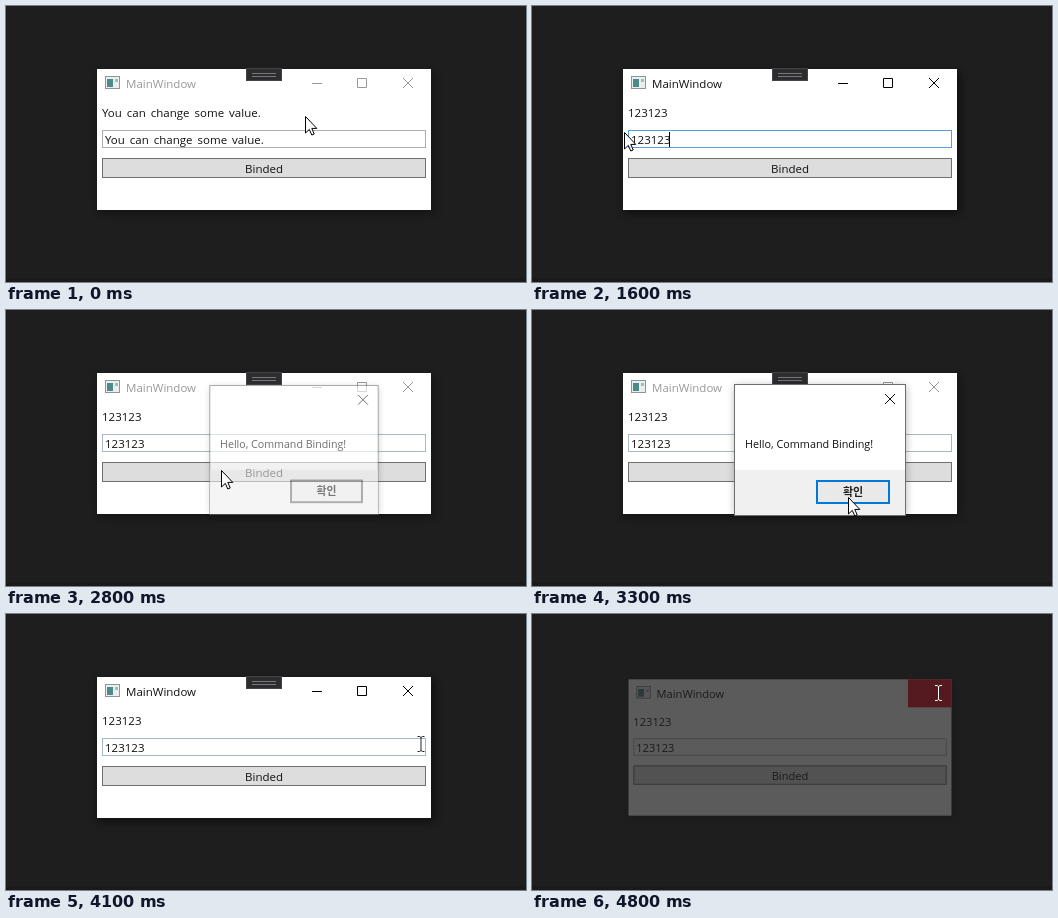
Animation of 520x276 px, one loop 4.9 s. Source, as an HTML page:

```html
<!DOCTYPE html>
<html lang="en">
<head>
<meta charset="utf-8">
<title>Binding demo</title>
<style>
  html, body { margin: 0; width: 100%; height: 100%; overflow: hidden; background: #1e1e1e; }
  svg { display: block; width: 520px; height: 276px; }
  text { font: 11.5px "Open Sans", "Noto Sans", sans-serif; word-spacing: 2px; fill: #111; white-space: pre; }
  #dialog text { font-size: 10.8px; word-spacing: 0; }
  #dialog .ok { font: 600 11px "Noto Sans CJK KR", "Noto Sans CJK", sans-serif; fill: #222; }
  .line { fill: none; stroke-width: 1; }
</style>
</head>
<body>
<svg viewBox="0 0 520 276">
  <defs>
    <filter id="soft" x="-20%" y="-20%" width="140%" height="150%"><feGaussianBlur stdDeviation="4"/></filter>
  </defs>
  <rect width="520" height="276" fill="#1e1e1e"/>
  <rect y="272" width="520" height="4" fill="#1b1a1a"/>

  <g id="window">
    <rect id="shadow" x="92" y="66" width="336" height="142" filter="url(#soft)"/>
    <rect x="91" y="63" width="334" height="141" fill="#fff"/>
    <g id="icon">
      <rect x="99.5" y="70.5" width="14" height="12" fill="#e9eeee" stroke="#8d9696"/>
      <rect x="101" y="73" width="6" height="8" fill="#4f8a8b"/>
      <rect x="109" y="73" width="3" height="3" fill="#a9b8b8"/>
    </g>
    <text id="title" x="120" y="82">MainWindow</text>
    <rect id="closeBg" x="380" y="63" width="45" height="29"/>
    <path id="sizers" class="line" d="M306 77.5h10M351.5 72.5h9v9h-9z"/>
    <path id="close" class="line" d="M397 72l10 10M407 72l-10 10"/>
    <text id="label" x="96" y="111"></text>
    <rect id="box" x="96.5" y="124.5" width="323" height="17" fill="#fff"/>
    <text id="input" x="99" y="138"></text>
    <rect id="selection" y="125" height="17" fill="#0078d7" opacity=".42"/>
    <path id="caret" class="line" stroke="#000"/>
    <rect id="button" x="96.5" y="152.5" width="323" height="19"/>
    <text x="258" y="167" text-anchor="middle">Binded</text>
  </g>

  <g id="handle">
    <rect x="240.5" y="62.5" width="35" height="12" fill="#2d2d30" stroke="#434346"/>
    <path class="line" d="M246 67.5h24M246 70.5h24" stroke="#77777a"/>
  </g>

  <g id="dialog">
    <rect x="203" y="76" width="171" height="130" filter="url(#soft)" opacity=".3"/>
    <rect x="202.5" y="74.5" width="171" height="131" fill="#fff" stroke="#6e6e6e"/>
    <rect x="203" y="160" width="170" height="45" fill="#f0f0f0"/>
    <path class="line" d="M353 84l10 10M363 84l-10 10" stroke="#111"/>
    <text x="213" y="138">Hello, Command Binding!</text>
    <rect id="okBox" x="285" y="171" width="72" height="22" stroke-width="2"/>
    <text class="ok" x="321" y="186" text-anchor="middle">확인</text>
  </g>

  <path id="arrow" d="M.5 .5V17L4.3 13.4L6.8 19L9.2 18L6.8 12.4H11.8Z" fill="#fff" stroke="#000"/>
  <path id="beam" class="line" d="M-3.5-7.5H-1.5L0-6.5L1.5-7.5H3.5M0-6.5V6.5M-3.5 7.5H-1.5L0 6.5L1.5 7.5H3.5"/>
</svg>
<script>
const LOOP = 4900, STEP = 100;
const SENTENCE = "You can change some value.", TYPED = "123123";

// time, x, y, pointer; each entry holds until the next one
const POINTER = [
  [0, 299, 110, "arrow"], [100, 288, 119, "arrow"], [200, 266, 133, "beam"], [300, 258, 134, "beam"],
  [400, 190, 134, "beam"], [500, 110, 134, "beam"], [600, 61, 135, "beam"], [700, 92, 126, "arrow"],
  [2100, 160, 136, "beam"], [2200, 221, 150, "arrow"], [2400, 215, 160, "arrow"], [2900, 230, 163, "arrow"],
  [3000, 262, 170, "arrow"], [3100, 295, 178, "arrow"], [3200, 312, 184, "arrow"], [3300, 316, 187, "arrow"],
  [3600, 335, 175, "arrow"], [3700, 352, 155, "arrow"], [3800, 362.5, 140, "beam"], [3900, 372, 153, "arrow"],
  [4000, 395, 152, "arrow"], [4100, 415, 130, "beam"], [4200, 428.5, 105, "beam"], [4300, 428.5, 80, "beam"],
  [4600, 412.5, 79, "beam"], [4700, 405.5, 80, "beam"], [4800, 406.5, 79, "beam"]
];
// time, opacity, scale
const DIALOG = [[0, 0, 1], [2700, .2, .95], [2800, .6, .985], [2900, 1, 1], [3500, .45, .97], [3600, 0, 1]];
const BORDER = [[0, "#abadb3"], [200, "#7eb4ea"], [300, "#569de5"], [2500, "#a9b9c9"], [3600, "#a0a2a6"], [4100, "#a4b8c2"]];
const BUTTON = [[0, "rest"], [2400, "hover"], [2500, "press"], [2700, "rest"], [3700, "hover"],
  [3800, "rest"], [3900, "hover"], [4100, "rest"]];
const BUTTON_LOOK = { rest: ["#ddd", "#707070"], hover: ["#bee6fd", "#3c7fb1"], press: ["#c4e5f6", "#2c628b"] };
const CLOSE = [[0, "none"], [4600, "#e81123"], [4700, "#f1707a"], [4800, "#e81123"]];

const el = {};
document.querySelectorAll("[id]").forEach(n => el[n.id] = n);

const during = (t, a, b) => t >= a && t < b;
const at = (keys, t) => keys.filter(k => k[0] <= t).pop().slice(1);
const show = (node, on) => node.setAttribute("visibility", on ? "visible" : "hidden");
const set = (node, attrs) => { for (const k in attrs) node.setAttribute(k, attrs[k]); };
const zoom = (x, y, s) => `translate(${x} ${y}) scale(${s}) translate(${-x} ${-y})`;

function drawText(t) {
  const count = Math.min(6, Math.floor((t - 1100) * 1.2 / STEP));
  const value = t < 1200 ? SENTENCE : TYPED.slice(0, count);
  el.label.textContent = el.input.textContent = value;

  const end = 99 + el.input.getComputedTextLength();
  const [x] = at(POINTER, t);
  const start = t < 600 ? Math.max(98, x) : 98;
  show(el.selection, during(t, 400, 1200));
  set(el.selection, { x: start, width: Math.max(0, end - start) });

  show(el.caret, during(t, 300, 400) || during(t, 1200, 2500));
  set(el.caret, { d: `M${Math.round(end) - .5} 126V141` });
}

function drawWindow(t) {
  const closing = t >= 4800;
  const active = during(t, 300, 2700) || t >= 3600;
  const ink = active ? "#000" : "#999";
  set(el.window, closing ? { opacity: .27, transform: zoom(258, 133.2, .967) } : { opacity: 1, transform: "" });
  set(el.shadow, { opacity: active ? .5 : .35 });
  el.title.style.fill = active ? "#111" : "#999";

  const [closeFill] = at(CLOSE, t);
  set(el.closeBg, { fill: closeFill });
  set(el.close, { stroke: closeFill === "none" ? ink : "#fff" });
  set(el.sizers, { stroke: ink });
  show(el.close, !closing);
  show(el.sizers, !closing);
  show(el.handle, !closing);

  set(el.box, { stroke: at(BORDER, t)[0] });
  const [fill, stroke] = BUTTON_LOOK[at(BUTTON, t)[0]];
  set(el.button, { fill, stroke });
}

function drawDialog(t) {
  const [opacity, scale] = at(DIALOG, t);
  set(el.dialog, { opacity, transform: zoom(288, 140, scale) });
  const pressed = during(t, 3400, 3500);
  set(el.okBox, {
    fill: pressed ? "#cce4f7" : "#e9e9e9",
    stroke: during(t, 2900, 3500) ? (pressed ? "#005499" : "#0078d7") : "#777"
  });
}

function drawPointer(t) {
  const [x, y, kind] = at(POINTER, t);
  for (const name of ["arrow", "beam"]) show(el[name], name === kind);
  set(el[kind], { transform: `translate(${x} ${y})` });
  const overDark = x < 88 || x > 425 || t >= 4800;
  set(el.beam, { stroke: overDark ? "#fff" : t >= 4600 ? "#555" : "#222" });
}

function draw(ms) {
  const t = Math.floor(ms % LOOP / STEP) * STEP;
  drawText(t);
  drawWindow(t);
  drawDialog(t);
  drawPointer(t);
}

const began = performance.now();
function tick() {
  draw(performance.now() - began);
  requestAnimationFrame(tick);
}
tick();
</script>
</body>
</html>
```
